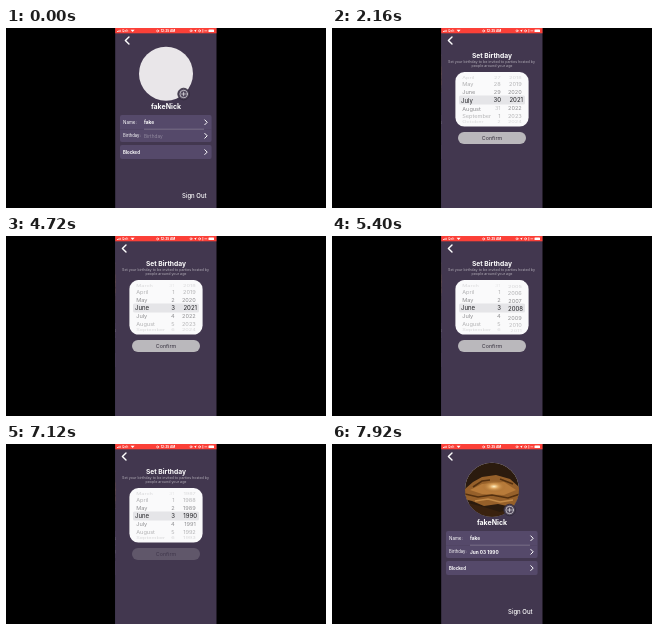
Write an HTML page that moves like this. It is 320 px wide and 180 px high and loops after 8 s.

```html
<!DOCTYPE html>
<html lang="en">
<head>
<meta charset="utf-8">
<title>Set a birthday</title>
<style>
  html, body { margin: 0; width: 100%; height: 100%; overflow: hidden; background: #000; }
  svg { display: block; width: 100vw; height: 100vh; }
  text { font-family: Inter, Roboto, sans-serif; fill: #fff; }
  .bold { font-weight: 700; }
  .mid { text-anchor: middle; }
  .end { text-anchor: end; }
  .line { fill: none; stroke: #fff; stroke-linecap: round; stroke-linejoin: round; }
  .page { fill: #42374f; }
  .row { fill: #55496a; }
  #wheels text { fill: #202024; }
</style>
</head>
<body>
<svg viewBox="0 0 320 180">
  <defs>
    <clipPath id="phone"><rect x="109.2" width="101.3" height="180"/></clipPath>
    <clipPath id="round"><circle cx="160" cy="45.7" r="27"/></clipPath>
    <clipPath id="card"><rect x="123.4" y="44" width="73.2" height="54.6" rx="9"/></clipPath>
    <radialGradient id="glow">
      <stop stop-color="#fff0c4"/><stop offset=".35" stop-color="#dca45e"/>
      <stop offset="1" stop-color="#a0682c" stop-opacity="0"/>
    </radialGradient>
  </defs>
  <rect width="320" height="180"/>
  <g clip-path="url(#phone)">
    <g id="profile">
      <rect class="page" x="109" width="103" height="180"/>
      <circle cx="160" cy="45.7" r="27" fill="#e9e6e9"/>
      <g id="photo" clip-path="url(#round)">
        <rect x="132" y="18" width="56" height="56" fill="#2b1b0e"/>
        <path d="M132 58Q150 62 168 68L188 62V74H132Z" fill="#3a220f"/>
        <path d="M132 46L141 38 150 33 164 31 178 35 188 44V56L180 63 166 60 152 62 140 57 132 55Z" fill="#96602a"/>
        <path d="M138 46L150 40 172 38 184 46 172 51 150 50Z" fill="#b87b3a"/>
        <ellipse cx="162" cy="42.5" rx="12" ry="6" fill="url(#glow)"/>
        <path d="M133 50L146 53 160 51 176 54 188 50M141 43L150 37 158 36M168 35L181 40" fill="none" stroke="#54300f" stroke-width="1.6"/>
        <path d="M143 57L156 55 168 58 181 56" fill="none" stroke="#c48a48" stroke-width="1.3"/>
      </g>
      <circle cx="177.6" cy="66" r="5.8" fill="#50475b" stroke="#2d2637" stroke-width=".8"/>
      <circle cx="177.6" cy="66" r="3.7" class="line" stroke-width=".6"/>
      <path d="M175.8 66h3.6M177.6 64.2v3.6" class="line" stroke-width=".6"/>
      <text class="bold mid" x="160" y="81.3" font-size="7">fakeNick</text>

      <path class="row" d="M114 101.2V89q0-2 2-2h87.6q2 0 2 2v12.2z"/>
      <text x="117" y="95.8" font-size="4.5">Name:</text>
      <text class="bold" x="138" y="96" font-size="4.8">fake</text>
      <path class="line" d="M198.8 91.9l2.4 2.4-2.4 2.4" stroke-width="1"/>
      <g id="birthRow">
        <path class="row" d="M114 101.2h91.6V112q0 2-2 2H116q-2 0-2-2z"/>
        <text x="117" y="109.3" font-size="4.2">Birthday:</text>
        <text id="birthday" x="138" y="109.5" font-size="4.75"></text>
        <path class="line" d="M198.8 105.4l2.4 2.4-2.4 2.4" stroke-width="1"/>
      </g>
      <path d="M138 101.2h60" stroke="#92889f" stroke-width=".6"/>
      <rect class="row" x="114" y="117" width="91.6" height="14" rx="2"/>
      <text class="bold" x="117" y="125.7" font-size="4.3">Blocked</text>
      <path class="line" d="M198.8 121.7l2.4 2.4-2.4 2.4" stroke-width="1"/>
      <text x="176" y="170.4" font-size="6" font-weight="500">Sign Out</text>
    </g>

    <g id="picker">
      <rect class="page" x="109" width="103" height="180"/>
      <text class="bold mid" x="160" y="29.7" font-size="6.7">Set Birthday</text>
      <g class="mid" font-size="3.65" opacity=".58">
        <text x="159.6" y="35.2">Set your birthday to be invited to parties hosted by</text>
        <text x="160" y="39.3">people around your age</text>
      </g>
      <rect x="123.4" y="44" width="73.2" height="54.6" rx="9" fill="#fafafb"/>
      <rect x="127" y="67.6" width="66" height="8.8" rx="1.5" fill="#e5e5e8"/>
      <g id="wheels" clip-path="url(#card)"></g>
      <g id="confirm">
        <rect x="126" y="104" width="68" height="12" rx="6" fill="#bab8bc"/>
        <text class="mid" x="160" y="112" font-size="5.4" style="fill:#37323f">Confirm</text>
      </g>
    </g>

    <path id="backArrow" class="line" d="M120 8.9l-3.6 3.6 3.6 3.6" stroke-width="1.4"/>
    <rect x="109" width="103" height="5.3" fill="#fb4038"/>
    <g font-size="3.2" font-weight="500">
      <path d="M111.5 4v-1M112.8 4v-1.6M114.1 4v-2.2" stroke="#fff" stroke-width=".8"/>
      <text x="116" y="4">Qelt</text>
      <path d="M124.6 1.8h4L126.6 4z" fill="#fff"/>
      <circle cx="151.6" cy="2.9" r="1" class="line" stroke-width=".6"/>
      <text class="bold mid" x="162" y="4">12:35 AM</text>
      <circle cx="185" cy="2.8" r="1" class="line" stroke-width=".6"/>
      <path d="M187.8 2.8l2.8-1.2-1.2 2.6-.4-1.1z" fill="#fff"/>
      <circle cx="193.5" cy="2.8" r="1" class="line" stroke-width=".6"/>
      <path d="M196.8 1.5v2.6M198.8 2.8h2" class="line" stroke-width=".6"/>
      <rect x="202.5" y="1.5" width="5.5" height="2.6" rx=".6" fill="#fff"/>
    </g>
  </g>
</svg>
<script>
const LOOP = 8000;
const el = id => document.getElementById(id);
const months = ["January", "February", "March", "April", "May", "June", "July",
  "August", "September", "October", "November", "December"];
const wrap = (n, size) => ((n % size) + size) % size;
const clamp = n => Math.min(1, Math.max(0, n));
const progress = (t, from, to) => clamp((t - from) / (to - from));
const smooth = p => p * p * (3 - 2 * p);
const easeOut = p => 1 - (1 - p) ** 3;

// Eased value through [time, value] keys.
function follow(t, keys) {
  let value = keys[0][1];
  for (let i = 1; i < keys.length; i++) {
    const [from, previous] = keys[i - 1], [to, next] = keys[i];
    value += (next - previous) * smooth(progress(t, from, to));
  }
  return value;
}

function makeWheel(x, align, label, isValid, keys) {
  const rows = Array.from({ length: 9 }, () => {
    const row = document.createElementNS("http://www.w3.org/2000/svg", "text");
    row.setAttribute("class", align);
    el("wheels").append(row);
    return row;
  });
  return t => {
    const position = follow(t, keys);
    rows.forEach((row, k) => {
      const item = Math.round(position) + k - 4;
      const offset = item - position;
      const angle = offset * 0.311;
      const selected = Math.abs(offset) < 0.5;
      const size = selected ? 6 : 5.6;
      const fade = selected ? 1 : 0.56 * Math.cos(angle) ** 2.5;
      const shift = selected ? 0 : (160 - x) * 0.04;
      row.textContent = label(item);
      row.setAttribute("font-size", size);
      row.setAttribute("y", size * 0.36);
      row.setAttribute("opacity", Math.abs(offset) > 3.7 ? 0 : fade * (isValid(item) ? 1 : 0.5));
      row.setAttribute("transform",
        `translate(${x + shift} ${72 + 27.4 * Math.sin(angle)}) scale(1 ${Math.cos(angle)})`);
    });
  };
}

const always = () => true;
const dayOf = n => wrap(n - 1, 31) + 1;
const wheels = [
  makeWheel(129, "", n => months[wrap(n, 12)], always, [[2040, 6], [2900, 5]]),
  makeWheel(169, "end", dayOf, n => dayOf(n) <= 30, [[3480, 30], [4520, 34]]),
  makeWheel(191, "end", n => n, always,
    [[4760, 2021], [5300, 2009], [5980, 1989.7], [6060, 1989.7], [6320, 1990]])
];

function draw(t) {
  const shown = easeOut(progress(t, 1400, 1720)) - easeOut(progress(t, 7200, 7680));
  el("profile").setAttribute("transform", `translate(${-31 * shown} 0)`);
  el("picker").setAttribute("transform", `translate(${102 * (1 - shown)} 0)`);
  el("backArrow").setAttribute("transform", `translate(${3 * (1 - easeOut(progress(t, 0, 200)))} 0)`);
  el("photo").setAttribute("opacity", t < 440 ? 0 : 1);

  const saved = t > 7120;
  const birthday = el("birthday");
  birthday.textContent = saved ? "Jun 03 1990" : "Birthday";
  birthday.setAttribute("class", saved ? "bold" : "");
  birthday.setAttribute("opacity", saved ? 1 : 0.35);
  el("birthRow").setAttribute("opacity", saved ? 1 : 1 - 0.8 * smooth(progress(t, 1200, 1360)));
  el("confirm").setAttribute("opacity", 1 - 0.75 * smooth(progress(t, 6880, 7040)));
  wheels.forEach(turn => turn(t));
}

const start = performance.now();
function tick() {
  draw((performance.now() - start) % LOOP);
  requestAnimationFrame(tick);
}
tick();
</script>
</body>
</html>
```
